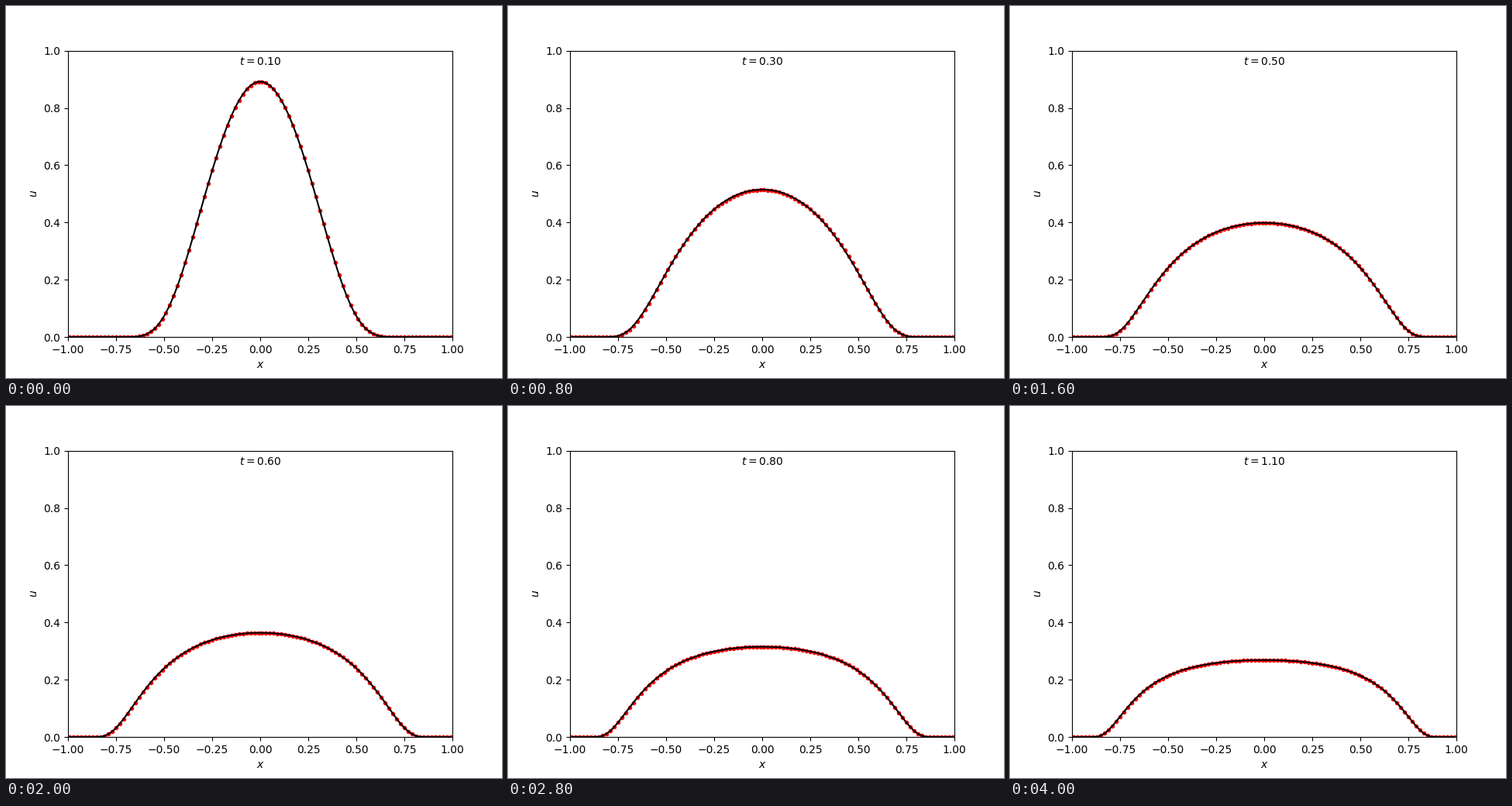
Recreate the animation shown at these times as a matplotlib script. Size 640 by 480 pixels, loop 4.4 s.

```python
import numpy as np
import matplotlib.pyplot as plt
from matplotlib.animation import FuncAnimation

CELLS, DT, T0, STEPS = 100, 0.05, 0.1, 20

# Heat equation on the whole real line, mapped to (-1, 1) by y = tan(pi x / 2)
dx = 2 / CELLS
x = -1 + dx * (np.arange(CELLS) + 0.5)
faces = -1 + dx * np.arange(CELLS + 1)


def metric(s):
    return 2 / np.pi * np.cos(np.pi * s / 2) ** 2


def exact(t):
    y = np.tan(np.pi * x / 2)
    return np.exp(-y**2 / (4 * t)) / np.sqrt(4 * np.pi * t)


def diffusion_matrix():
    flux = metric(faces)
    flux[[0, -1]] = 0
    inner = flux[1:-1]
    lap = np.diag(inner, 1) + np.diag(inner, -1) - np.diag(flux[:-1] + flux[1:])
    return metric(x)[:, None] * lap / dx**2


def crank_nicolson():
    half = DT / 2 * diffusion_matrix()
    eye = np.eye(CELLS)
    states = [exact(T0)]
    for _ in range(STEPS):
        states.append(np.linalg.solve(eye - half, (eye + half) @ states[-1]))
    return states


solution = crank_nicolson()

fig, ax = plt.subplots(figsize=(6.4, 4.8), dpi=100)
ax.set(xlim=(-1, 1), ylim=(0, 1), xlabel="$x$", ylabel="$u$")
dots, = ax.plot([], [], "r.")
curve, = ax.plot([], [], "k-")
label = ax.text(0, 0.95, "", ha="center")


def update(i):
    step = min(i, STEPS)
    t = T0 + step * DT
    dots.set_data(x, solution[step])
    curve.set_data(x, exact(t))
    label.set_text(f"$t={t:.2f}$")
    return dots, curve, label


anim = FuncAnimation(fig, update, frames=STEPS + 2, interval=200,
                     repeat=True, repeat_delay=0)
plt.show()
```
